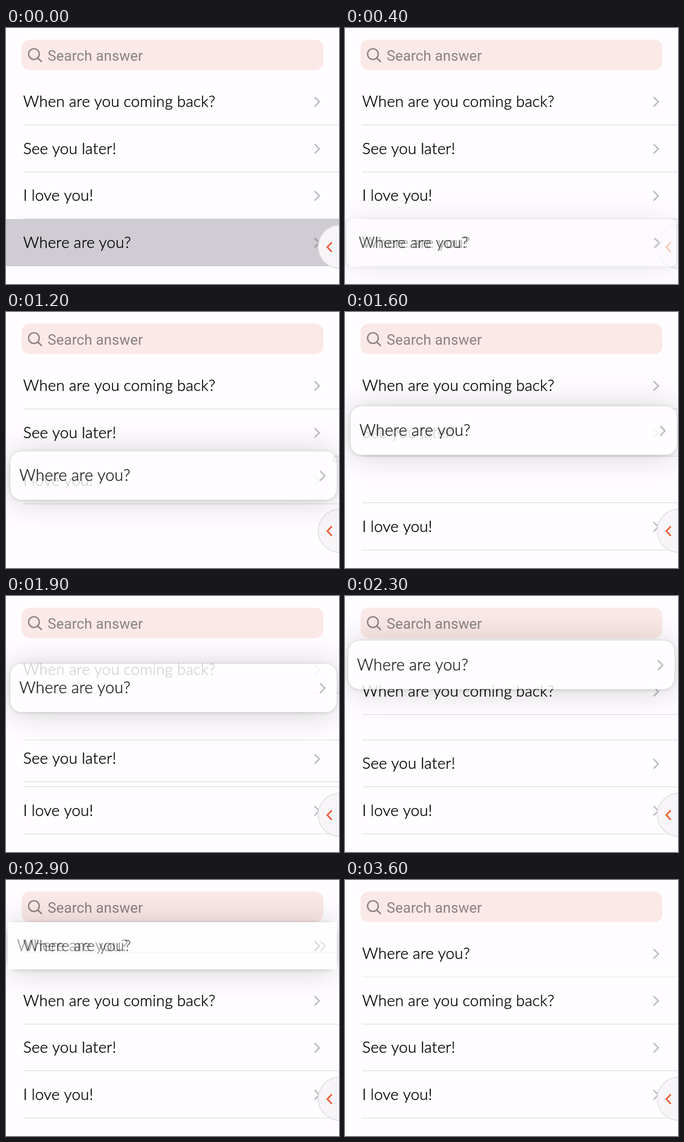
Write an HTML page with a canvas that moves like this. It is 600 px wide and 461 px high and loops after 3900 ms.

```html
<!DOCTYPE html>
<html lang="en">
<head>
<meta charset="utf-8">
<title>Reorder answers</title>
<style>
  html, body { margin: 0; width: 600px; height: 461px; overflow: hidden; background: #fffdff; }
  canvas { display: block; }
</style>
</head>
<body>
<canvas id="stage" width="600" height="461"></canvas>
<script>
const ctx = document.getElementById('stage').getContext('2d');
const LOOP = 3900, STEP = 100, PITCH = 84.6, FIRST = 132.5;
const DRAGGED = 'Where are you?';

const clamp = v => Math.min(1, Math.max(0, v));
const mix = (a, b, p) => a + (b - a) * p;
const ease = p => { p = clamp(p); return p * p * (3 - 2 * p); };
const slotY = slot => FIRST + slot * PITCH;

// Rows that give way: text, first slot, time at which each starts to move down
const rows = [
  ['When are you coming back?', 0, 2110],
  ['See you later!', 1, 1580],
  ['I love you!', 2, 1165]
];

// Dragged card: time, left edge, vertical centre
const drag = [
  [800, 6, 386.5], [900, 5, 362.5], [1200, 8.5, 294.5], [1600, 10.5, 213.5],
  [2100, 7, 133.5], [2300, 6.3, 124], [2500, 5, 118.5]
];

function dragAt(t) {
  const i = drag.findIndex(k => k[0] >= t);
  if (i === 0) return drag[0].slice(1);
  if (i < 0) return drag[drag.length - 1].slice(1);
  const a = drag[i - 1], b = drag[i], p = (t - a[0]) / (b[0] - a[0]);
  return [mix(a[1], b[1], p), mix(a[2], b[2], p)];
}

function stroke(points, color, width) {
  ctx.beginPath();
  points.forEach(([x, y]) => ctx.lineTo(x, y));
  ctx.strokeStyle = color;
  ctx.lineWidth = width;
  ctx.stroke();
}

function line(y, alpha = 1) {
  ctx.globalAlpha = alpha;
  ctx.fillStyle = '#dad8db';
  ctx.fillRect(31, Math.round(y - 0.5), 569, 1);
  ctx.globalAlpha = 1;
}

function content(text, x, chevronX, y, scale, alpha) {
  ctx.save();
  ctx.globalAlpha = alpha;
  ctx.translate(x, y);
  ctx.scale(scale, scale);
  ctx.font = '300 28px Lato, "Open Sans", sans-serif';
  ctx.letterSpacing = '0.3px';
  ctx.wordSpacing = '-0.5px';
  ctx.fillStyle = ctx.strokeStyle = '#000';
  ctx.lineWidth = 0.45;
  ctx.fillText(text, 0, 9.5);
  ctx.strokeText(text, 0, 9.5);
  ctx.restore();
  ctx.save();
  ctx.globalAlpha = Math.min(1, alpha * 1.2);
  ctx.translate(chevronX, y);
  ctx.scale(scale, scale);
  stroke([[-4.5, -8], [4, 0.5], [-4.5, 9]], 'rgba(60,60,67,.32)', 2.8);
  ctx.restore();
}

function row(text, y, alpha = 1) {
  content(text, 31, 560.5, y, 1, alpha);
}

function searchField() {
  ctx.fillStyle = '#fbe9e7';
  ctx.beginPath();
  ctx.roundRect(28, 21, 544, 55, 15);
  ctx.fill();
  ctx.strokeStyle = '#8a8183';
  ctx.lineWidth = 2.4;
  ctx.beginPath();
  ctx.arc(50.3, 47, 9.6, 0, 7);
  ctx.stroke();
  stroke([[57, 53.7], [64.5, 61]], '#8a8183', 2.6);
  ctx.font = '26px Roboto, Inter, sans-serif';
  ctx.letterSpacing = '0.1px';
  ctx.wordSpacing = '0px';
  ctx.fillStyle = '#8a8183';
  ctx.fillText('Search answer', 75, 58.5);
}

function sideButton() {
  ctx.beginPath();
  ctx.arc(601.5, 394, 39, 0, 7);
  ctx.fillStyle = '#f7f5f7';
  ctx.fill();
  ctx.strokeStyle = '#dcdadd';
  ctx.lineWidth = 1.3;
  ctx.stroke();
  stroke([[587, 386], [579, 394.5], [587, 403]], '#e5633f', 3);
}

function shadow(x, y, w, h, radius, holeRadius) {
  ctx.save();
  ctx.beginPath();
  ctx.rect(0, 0, 600, 461);
  ctx.roundRect(x, y, w, h, holeRadius);
  ctx.clip('evenodd');
  for (const [color, blur, dy] of [['rgba(0,0,0,.18)', 60, 2], ['rgba(0,0,0,.15)', 7, 1]]) {
    ctx.shadowColor = color;
    ctx.shadowBlur = blur;
    ctx.shadowOffsetY = dy;
    ctx.fillStyle = '#fff';
    ctx.beginPath();
    ctx.roundRect(x, y, w, h, radius);
    ctx.fill();
  }
  ctx.restore();
}

function badge(x, y) {
  ctx.globalAlpha = 0.15;
  ctx.strokeStyle = '#555';
  ctx.lineWidth = 1.2;
  for (const r of [6, 2.5]) {
    ctx.beginPath();
    ctx.arc(x, y, r, 0, 7);
    ctx.stroke();
  }
  ctx.globalAlpha = 1;
}

function card(t) {
  const lift = clamp((t - 100) / 600), drop = clamp((t - 2700) / 600);
  const settle = ease((t - 2900) / 400), release = clamp((t - 2700) / 200);
  const dropping = drop > 0;
  let [x, y] = dragAt(t);
  let w = mix(600, 587, lift), h = mix(PITCH, 87, lift);
  x = mix(0, x, lift);
  if (dropping) {
    x = mix(mix(x, 3, release), 0, settle);
    w = mix(mix(587, 593, release), 600, settle);
    h = mix(mix(87, 85, release), PITCH, settle);
    y = mix(y, FIRST, settle);
  }
  const top = y - h / 2, radius = 20 * lift, fade = clamp(lift * 1.6) * (1 - settle);

  ctx.globalAlpha = lift * (1 - settle);
  shadow(x, top, w, h, radius, dropping ? 0 : radius);
  ctx.globalAlpha = fade * (dropping ? 0.97 : 0.83);
  ctx.fillStyle = '#fffeff';
  ctx.beginPath();
  ctx.roundRect(x, top, w, h, radius);
  ctx.fill();
  ctx.globalAlpha = 1;

  const textX = dropping ? x + mix(15.5, 17, release) : mix(31, x + 15.5, lift);
  const chevronX = dropping ? x + mix(562, 568, release) : mix(560.5, x + 562, lift);
  const alpha = 0.82 * fade * clamp(1 - drop * 1.8);
  if (alpha > 0) content(DRAGGED, textX, chevronX, y, mix(1, 1.03, lift), alpha);
  if (t >= 900 && t <= 1300) badge(x + 587.5, top + 14.5);
  if (dropping) {
    line(mix(130, 174.5, settle), mix(0.35, 0.6, settle));
    row(DRAGGED, y, clamp(drop * 1.6));
  }
}

function draw(t) {
  ctx.fillStyle = '#fffdff';
  ctx.fillRect(0, 0, 600, 461);
  searchField();

  for (const [text, slot, start] of rows) {
    const y = slotY(slot + ease((t - start) / 400));
    row(text, y);
    line(y + 42);
  }
  if (t >= 1300) line(slotY(2) + 42);
  if (t >= 1700) line(slotY(1) + 42);

  // The row's resting place, highlighted by the press and then emptied
  const home = clamp((1100 - t) / 300);
  if (home > 0) {
    ctx.globalAlpha = clamp(1 - (t - 100) / 350);
    ctx.fillStyle = '#d0ccd3';
    ctx.fillRect(0, 344, 600, 85);
    if (t >= 200) line(428.5, home);
    row(DRAGGED, slotY(3), home);
  }

  ctx.globalAlpha = 1;
  sideButton();
  if (t >= 200 && t < 3300) card(t);
  ctx.globalAlpha = 1;
  if (t >= 3300) {
    row(DRAGGED, FIRST);
    line(174.5, 0.6);
  }
}

function tick() {
  draw(Math.floor(performance.now() % LOOP / STEP) * STEP);
  requestAnimationFrame(tick);
}
tick();
</script>
</body>
</html>
```
